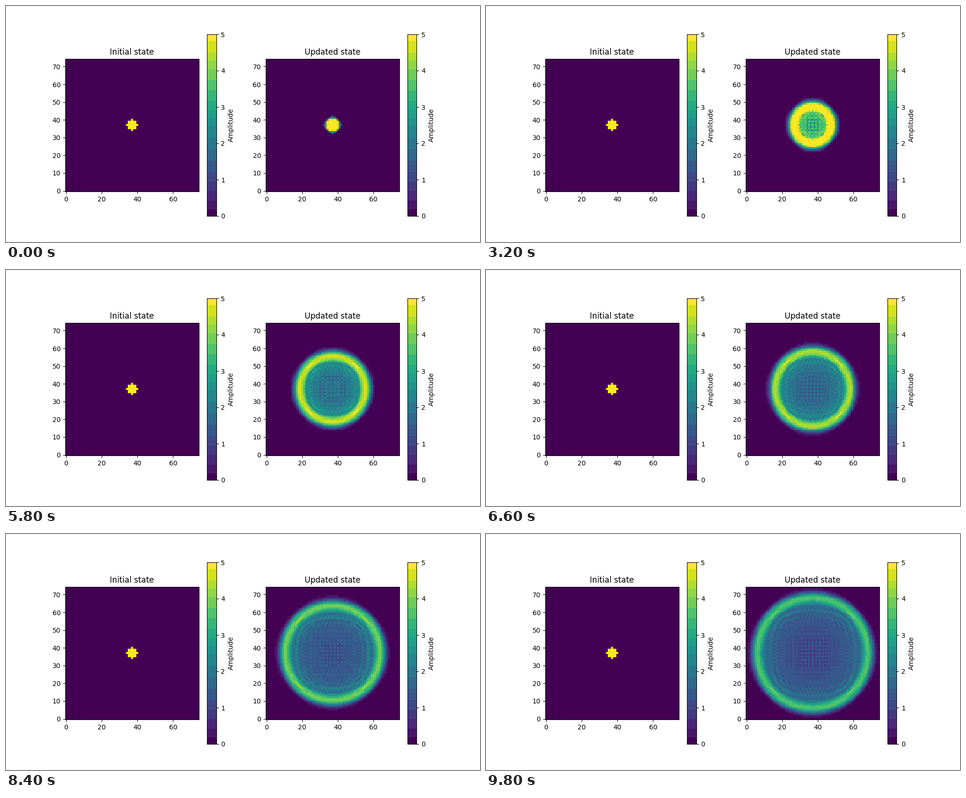
Write a matplotlib script that moves like this. It is 1000 by 500 pixels and loops after 10000 ms.

```python
import numpy as np
import matplotlib.pyplot as plt
from matplotlib.animation import FuncAnimation
from matplotlib.colors import ListedColormap

SIZE = 75
RADIUS = 3
AMPLITUDE = 5.0
COURANT_SQ = 0.4
FRAMES = 50
INTERVAL = 200

# Upper edges of the colour bands, as amplitudes
BAND_EDGES = [0, 0.17, 0.43, 0.68, 0.94, 1.21, 1.51, 1.82, 2.14, 2.48, 2.70,
              2.92, 3.17, 3.46, 3.74, 4.04, 4.29, 4.52, 4.82, 5]


def banded_viridis():
    """Viridis reduced to flat bands, with its exact end colours."""
    viridis = plt.get_cmap("viridis")
    edges = np.array(BAND_EDGES) / AMPLITUDE
    middles = (edges[:-1] + edges[1:]) / 2
    middles[0], middles[-1] = 0, 1
    bands = np.searchsorted(edges[1:-1], np.linspace(0, 1, 512), side="right")
    return ListedColormap(viridis(middles[bands]))


def initial_state():
    y, x = np.indices((SIZE, SIZE)) - SIZE // 2
    return np.where(x**2 + y**2 <= RADIUS**2, AMPLITUDE, 0.0)


def step(prev, cur):
    """Advance the wave equation with fixed zero borders."""
    lap = (cur[2:, 1:-1] + cur[:-2, 1:-1] + cur[1:-1, 2:] + cur[1:-1, :-2]
           - 4 * cur[1:-1, 1:-1])
    new = np.zeros_like(cur)
    new[1:-1, 1:-1] = (2 * cur - prev)[1:-1, 1:-1] + COURANT_SQ * lap
    return cur, new


def simulate(start):
    prev, cur = step(np.zeros_like(start), start)
    states = []
    for _ in range(FRAMES):
        prev, cur = step(prev, cur)
        states.append(cur)
    return states


def draw_panel(ax, state, title):
    image = ax.imshow(state, origin="lower", cmap=CMAP, vmin=0, vmax=AMPLITUDE)
    ax.set_title(title)
    fig.colorbar(image, ax=ax, label="Amplitude")
    return image


CMAP = banded_viridis()
start = initial_state()
states = simulate(start)

fig, (left, right) = plt.subplots(1, 2, figsize=(10, 5), dpi=100)
draw_panel(left, start, "Initial state")
wave = draw_panel(right, states[0], "Updated state")


def update(i):
    wave.set_data(states[i])
    return [wave]


anim = FuncAnimation(fig, update, frames=FRAMES, interval=INTERVAL,
                     repeat=True, repeat_delay=0)
plt.show()
```
